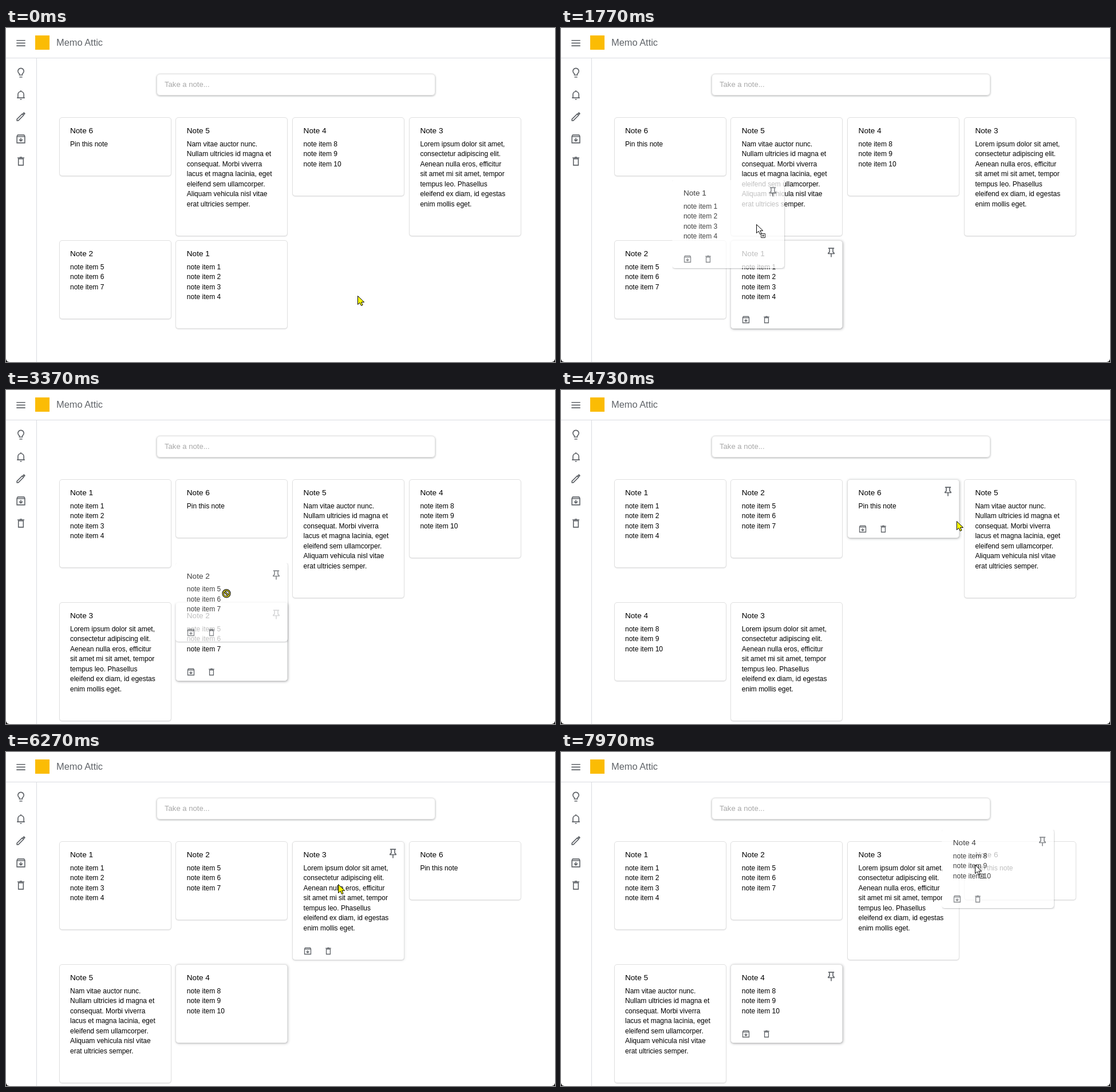
Write an HTML page that moves like this. It is 959 by 584 pixels and loops after 8 s.

```html
<!DOCTYPE html>
<html lang="en">
<head>
<meta charset="utf-8">
<title>Notes board</title>
<style>
  html, body { margin: 0; width: 100%; height: 100%; overflow: hidden; background: #111; }
  #stage { position: relative; width: 959px; height: 584px; overflow: hidden; background: #fff;
    border-radius: 0 0 6px 6px; font-family: "Liberation Sans", Arial, sans-serif; color: #000; }
  #stage * { position: absolute; box-sizing: border-box; }
  svg { overflow: visible; }
  .icon { fill: none; stroke: #5f6368; stroke-width: 1.9; transform: translate(-50%, -50%); }
  .icon * { position: static; }
  header { left: 0; top: 0; width: 100%; height: 53px; border-bottom: 1px solid #dadce0; }
  nav { left: 0; top: 53px; width: 54px; bottom: 0; border-right: 1px solid #dadce0; }
  #logo { left: 51px; top: 13px; width: 25px; height: 25px; background: #fbbc04; }
  #name { left: 88px; top: 15px; font-size: 16.4px; line-height: 20px; color: #5f6368; white-space: nowrap; }
  #entry { left: 263px; top: 80px; width: 487px; height: 38px; border-radius: 6px; padding-left: 13px;
    font-size: 13.1px; line-height: 36px; color: #a8a8a8; border: 1px solid #e0e0e0;
    box-shadow: 0 1px 3px rgba(60, 64, 67, .4); }
  .card { width: 196px; background: #fff; border: 1px solid #e0e0e0; border-radius: 5px; }
  .card h2 { margin: 0; left: 18.4px; top: 13px; font: 13.6px/20px "Liberation Sans", Arial, sans-serif; white-space: nowrap; }
  .card p { margin: 0; left: 18.4px; top: 37.6px; font-size: 12px; line-height: 17.5px; white-space: pre; }
  .tools { inset: 0; }
  #ghost { opacity: .75; clip-path: inset(1px -1px -2px 0); border-color: transparent; }
  #pointer { left: 0; top: 0; width: 24px; height: 24px; }
</style>
</head>
<body>
<div id="stage">
  <header><div id="logo"></div><div id="name">Memo Attic</div></header>
  <nav></nav>
  <div id="entry">Take a note...</div>
</div>
<script>
const LOOP = 8000, FADE = 200;
const stage = document.getElementById('stage');

const icons = {
  menu: 'M3 7h18M3 12.5h18M3 18h18',
  bulb: 'M9 17h6v-2.8a6 6 0 1 0-6 0zM9 21h6',
  bell: 'M6 18v-7a6 6 0 0 1 12 0v7M4 18h16M12 2.5v2.5M10.3 21h3.4',
  pencil: 'M4 20v-2.8L14.8 6.4l2.8 2.8L6.8 20zM17 5.2l1.2-1.2 1.8 1.8-1.2 1.2z',
  archive: 'M4 6.5L5.5 4h13L20 6.5V20H4zM4 7h16M12 10v6M8.5 13l3.5 3.5 3.5-3.5',
  trash: 'M7 7v13h10V7zM5 5h14M9.5 4h5',
  pin: 'M6 4h12M8.5 4v7.5L6 14v1h12v-1l-2.5-2.5V4M12 15v7'
};
const icon = (name, x, y, size = 20.5) =>
  `<svg class="icon" viewBox="0 0 24 24" width="${size}" height="${size}" style="left:${x}px;top:${y}px"><path d="${icons[name]}"/></svg>`;

const items = (first, last) =>
  Array.from({ length: last - first + 1 }, (_, i) => `note item ${first + i}`);
const notes = {
  1: items(1, 4),
  2: items(5, 7),
  3: ['Lorem ipsum dolor sit amet,', 'consectetur adipiscing elit.', 'Aenean nulla eros, efficitur',
    'sit amet mi sit amet, tempor', 'tempus leo. Phasellus', 'eleifend ex diam, id egestas', 'enim mollis eget.'],
  4: items(8, 10),
  5: ['Nam vitae auctor nunc.', 'Nullam ultricies id magna et', 'consequat. Morbi viverra',
    'lacus et magna lacinia, eget', 'eleifend sem ullamcorper.', 'Aliquam vehicula nisl vitae', 'erat ultricies semper.'],
  6: ['Pin this note']
};

// Pointer strokes; those with a slot drag the last card there and release it at `drop`.
const strokes = [
  { start: 600, end: 960, to: [443, 449] },
  { start: 1400, end: 2140, to: [240, 238], slot: 0, drop: 2180 },
  { start: 2230, end: 3020, via: [225, 440], to: [385, 425] },
  { start: 3170, end: 3702, to: [385, 209], slot: 1, drop: 3860 },
  { start: 4030, end: 4740, via: [500, 353], to: [691, 229] },
  { start: 4870, end: 5320, to: [376, 446] },
  { start: 5530, end: 6110, to: [580, 231], slot: 2, drop: 6180 },
  { start: 6370, end: 6760, to: [250, 440] },
  { start: 7100, end: 7260, to: [354, 433] },
  { start: 7330, end: 7970, via: [541, 250], to: [723, 197], slot: 3, drop: 9000 }
];
const SOURCE = 5, STALE = 50;

const slotX = i => 92.6 + 203.8 * (i % 4);
const slotY = i => i < 4 ? 156 : 371;
const cardHeight = note => Math.floor(85.5 + 17.5 * notes[note].length);

function along(a, via, b, p) {
  const u = Math.min(1, p), e = u * u * (3 - 2 * u);
  return a.map((v, k) => {
    const c = via ? via[k] : (v + b[k]) / 2;
    return (1 - e) ** 2 * v + 2 * e * (1 - e) * c + e * e * b[k];
  });
}

const slotAt = ([x, y], order) => order.findIndex((note, i) =>
  x >= slotX(i) && x < slotX(i) + 196 && y >= slotY(i) && y < slotY(i) + cardHeight(note));

function stateAt(t) {
  const order = [6, 5, 4, 3, 2, 1];
  let pos = [614, 468], grab = null, held = false;
  for (const s of strokes) {
    if (t < s.start) break;
    const from = pos;
    pos = along(from, s.via, s.to, (t - s.start) / (s.end - s.start));
    grab = s.drop > t ? from : null;
    held = s.drop + STALE > t;
    if (s.drop <= t) order.splice(s.slot, 0, order.pop());
  }
  const over = slotAt(pos, order);
  return { order, pos, grab, over, hover: held ? SOURCE : over };
}

function makeCard(id = '') {
  const el = document.createElement('div');
  el.className = 'card';
  el.id = id;
  stage.append(el);
  return el;
}

function drawCard(el, note, x, y, tools, glow) {
  const h = cardHeight(note);
  if (el.note !== note) {
    el.note = note;
    el.innerHTML = `<h2>Note ${note}</h2><p>${notes[note].join('\n')}</p><div class="tools">` +
      icon('pin', 175, 20) + icon('archive', 25.5, h - 17, 16.5) + icon('trash', 61.5, h - 17, 16.5) + '</div>';
    el.style.height = h + 'px';
  }
  el.lastChild.style.display = tools ? '' : 'none';
  el.style.left = x + 'px';
  el.style.top = y + 'px';
  el.style.boxShadow = `0 1px 1px rgba(60,64,67,.13), 1px 1px 4px rgba(60,64,67,${.36 * glow})`;
}

const arrow = fill => `<path d="M.5 .5v15l3.6-3.3 2.4 5.3 2.6-1.2-2.4-5h5z" fill="${fill}" stroke="#000"/>`;
const ring = '<circle r="5.8"/><path d="M-4-4L4 4"/>';
const pointers = {
  normal: arrow('#ff0'),
  move: arrow('#fff') + '<path d="M8.5 16.5h7v7h-7zM12 18v4M10 20h4" fill="#fff" stroke="#222"/>',
  blocked: `<g fill="none" stroke="#222" stroke-width="3.8">${ring}</g><g fill="none" stroke="#c8c020" stroke-width="1.5">${ring}</g>`
};

stage.insertAdjacentHTML('beforeend', icon('menu', 26, 26) +
  ['bulb', 'bell', 'pencil', 'archive', 'trash'].map((n, i) => icon(n, 26, 78 + 38.7 * i)).join(''));
const cards = Array.from({ length: 6 }, () => makeCard());
const ghost = makeCard('ghost');
stage.insertAdjacentHTML('beforeend', '<svg id="pointer"></svg>');
const pointer = document.getElementById('pointer');
let shape;

function draw(t) {
  const { order, pos, grab, over, hover } = stateAt(t);

  // The shadow fades linearly, so its strength is the recent share of hovering.
  const glow = Array(6).fill(0), samples = 20;
  for (let k = 0; k < samples; k++) {
    const h = stateAt(Math.max(0, t - k * FADE / samples)).hover;
    if (h >= 0) glow[h] += 1 / samples;
  }
  cards.forEach((el, i) => drawCard(el, order[i], slotX(i), slotY(i), i === hover, glow[i]));

  ghost.style.display = grab ? '' : 'none';
  if (grab) {
    drawCard(ghost, order[SOURCE], slotX(SOURCE) + pos[0] - grab[0], slotY(SOURCE) + pos[1] - grab[1], true, 1);
  }

  const next = !grab ? 'normal' : over < 0 ? 'blocked' : 'move';
  if (next !== shape) pointer.innerHTML = pointers[shape = next];
  pointer.style.transform = `translate(${pos[0]}px, ${pos[1]}px)`;
}

const begin = performance.now();
function tick() {
  draw((performance.now() - begin) % LOOP);
  requestAnimationFrame(tick);
}
tick();
</script>
</body>
</html>
```
